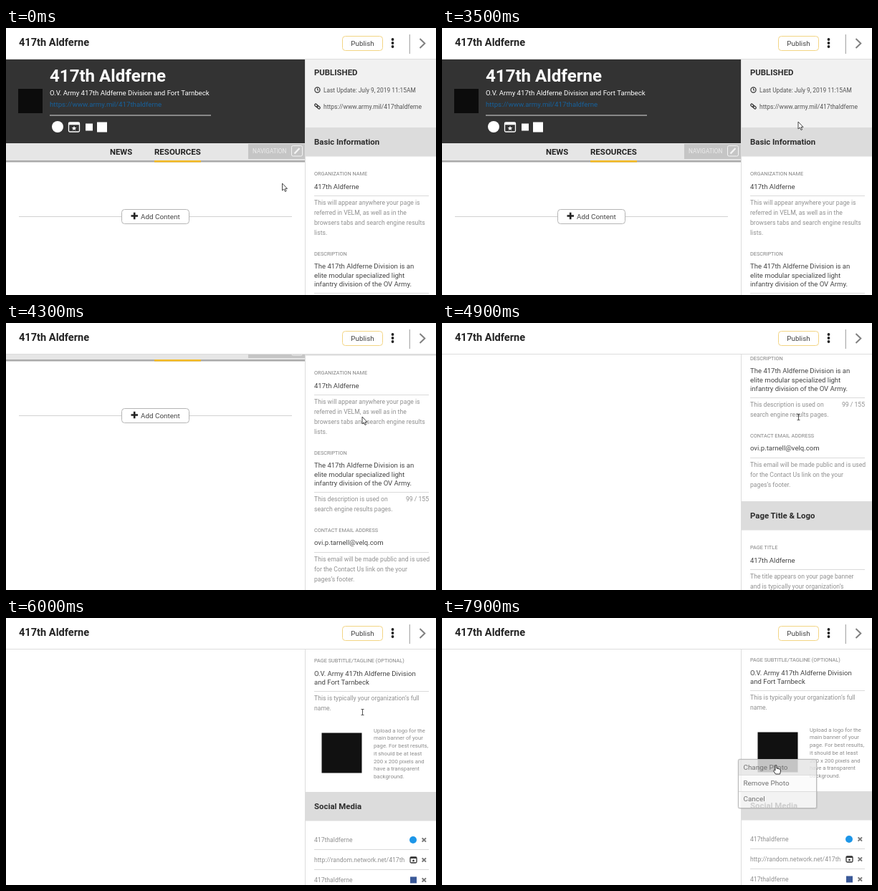
Recreate the animation shown at these times as an HTML page. Size 600x373 px, loop 8000 ms.

```html
<!DOCTYPE html>
<html lang="en">
<head>
<meta charset="utf-8">
<title>Page editor</title>
<style>
html, body { margin: 0; width: 100%; height: 100%; overflow: hidden; background: #fff; }
svg { display: block; font-family: Roboto, Inter, sans-serif; }
</style>
</head>
<body>
<svg id="stage" width="600" height="373" viewBox="0 0 600 373"></svg>
<script>
const LOOP = 8000, STEP = 100;
const NAME = '417th Aldferne', HANDLE = '417thaldferne';
const URL_TEXT = 'https://www.army.mil/' + HANDLE;

// Drawing helpers, all returning SVG markup
const text = (x, y, size, str, fill = '#333', weight = 400, extra = '') =>
  `<text x="${x}" y="${y}" font-size="${size}" fill="${fill}" font-weight="${weight}" ${extra}>${str}</text>`;
const rect = (x, y, w, h, fill, extra = '') =>
  `<rect x="${x}" y="${y}" width="${w}" height="${h}" fill="${fill}" ${extra}/>`;
const path = (d, stroke, width = 1, extra = '') =>
  `<path d="${d}" fill="none" stroke="${stroke}" stroke-width="${width}" ${extra}/>`;
const circle = (x, y, r, fill, extra = '') =>
  `<circle cx="${x}" cy="${y}" r="${r}" fill="${fill}" ${extra}/>`;
const lines = (x, y, gap, size, rows, fill, weight) =>
  rows.map((row, i) => text(x, y + i * gap, size, row, fill, weight)).join('');

const label = (y, str) => text(430, y, 7.3, str, '#808080');
const value = (y, ...rows) => lines(430, y, 12.5, 9.55, rows, '#444', 400);
const help = (y, ...rows) => lines(430, y, 14, 8.65, rows, '#909090', 400);
const rule = y => path(`M430 ${y}H590`, '#dadada');
const band = (y, str) => rect(418, y, 182, 40.5, '#dcdcdc') + text(430, y + 24, 11.4, str, '#2c2c2c', 600);

const star = (x, y, r) => '<polygon fill="currentColor" points="' + Array.from({ length: 10 }, (_, i) => {
  const a = i * Math.PI / 5, q = i % 2 ? r * .45 : r;
  return (x + q * Math.sin(a)).toFixed(2) + ',' + (y - q * Math.cos(a)).toFixed(2);
}).join(' ') + '"/>';
const windowIcon = (x, y, w, h) =>
  rect(x - w / 2, y - h / 2, w, h, 'none', 'rx="1.5" stroke="currentColor" stroke-width="1.3"') +
  rect(x - w / 2, y - h / 2, w, h * .25, 'currentColor') + star(x, y + h * .13, h * .27);

const banner = () =>
  rect(0, 43, 417, 118, '#333') +
  rect(17, 85, 34, 34, '#0c0c0c') +
  text(61, 75, 24.1, NAME, '#fff', 700) +
  text(61, 94, 9.65, `O.V. Army ${NAME} Division and Fort Tarnbeck`, '#fff') +
  text(61, 110, 9.7, URL_TEXT, '#17619c') +
  path('M61 122H286', '#ddd') +
  `<g class="social">${circle(72, 138, 8, 'currentColor')}</g>` +
  `<g class="social">${windowIcon(95, 138.5, 15, 13)}</g>` +
  `<g class="social">${rect(111, 133.5, 10, 10, 'currentColor')}</g>` +
  `<g class="social">${rect(127, 131.5, 14, 14, 'currentColor')}</g>`;

const nav = () =>
  rect(0, 161, 417, 24, '#e6e6e6') + rect(0, 185, 417, 2.5, '#aaa') +
  text(145, 177, 11.3, 'NEWS', '#222', 600) +
  text(207, 177, 11.5, 'RESOURCES', '#222', 600) +
  rect(207, 185, 65, 2.5, '#f4b921') +
  rect(338, 162, 79, 21, '#c5c5c5') +
  text(344, 175, 8.2, 'NAVIGATION', '#ececec') +
  rect(398.5, 164.5, 15, 14.5, 'none', 'rx="2" stroke="#f4f4f4"') +
  path('M402.5 175.5L409.5 168', '#f4f4f4', 2.4);

const adder = () =>
  path('M18 263.5H399', '#d2d2d2') +
  rect(161.5, 253.5, 94, 20, '#fff', 'rx="4" stroke="#b5b5b5"') +
  path('M174.5 262.5H184M179.2 257.8V267.2', '#222', 2.6) +
  text(188, 267, 9.9, 'Add Content', '#444');

const panel = () =>
  rect(418, 43, 182, 96, '#f1f1f1') +
  text(430, 66.3, 11.4, 'PUBLISHED', '#2c2c2c', 600) +
  circle(434.5, 86.5, 3.6, 'none', 'stroke="#333" stroke-width="1.2"') +
  path('M434.5 84.2V86.8H436.4', '#333') +
  text(443, 89.8, 8.35, 'Last Update: July 9, 2019 11:15AM', '#555') +
  `<g transform="rotate(40 434.5 109.5)">` +
  rect(430, 108, 5, 3, 'none', 'rx="1.5" stroke="#333" stroke-width="1.2"') +
  rect(434, 108, 5, 3, 'none', 'rx="1.5" stroke="#333" stroke-width="1.2"') + '</g>' +
  text(443, 113, 8.5, URL_TEXT, '#555') +
  band(139, 'Basic Information') +
  label(206, 'ORGANIZATION NAME') + value(225, NAME) + rule(234.5) +
  help(247, 'This will appear anywhere your page is', 'referred in VELM, as well as in the',
    'browsers tabs and search engine results', 'lists.') +
  label(318, 'DESCRIPTION') +
  value(336.3, `The ${NAME} Division is an`, 'elite modular specialized light', 'infantry division of the OV Army.') +
  rule(370.5) +
  help(383, 'This description is used on', 'search engine results pages.') +
  text(590, 383, 8.65, '99 / 155', '#909090', 400, 'text-anchor="end"') +
  label(425.5, 'CONTACT EMAIL ADDRESS') + value(444, 'ovi.p.tarnell@velq.com') + rule(454.5) +
  help(466.5, 'This email will be made public and is used', 'for the Contact Us link on the your', 'pages’s footer.') +
  band(515, 'Page Title &amp; Logo') +
  label(582, 'PAGE TITLE') + value(600.5, NAME) + rule(610.5) +
  help(623, 'The title appears on your page banner', 'and is typically your organization’s', 'acronym.') +
  label(679, 'PAGE SUBTITLE/TAGLINE (OPTIONAL)') +
  value(697.5, `O.V. Army ${NAME} Division`, 'and Fort Tarnbeck') + rule(719.5) +
  help(732, 'This is typically your organization’s full', 'name.') +
  rect(440.5, 777.5, 56, 56, '#111') +
  lines(513, 776.7, 10.7, 7.75, ['Upload a logo for the', 'main banner of your', 'page. For best results,',
    'it should be at least', '200 x 200 pixels and', 'have a transparent', 'background.'], '#8c8c8c', 400) +
  band(860, 'Social Media') +
  help(929.5, HANDLE) + help(957.5, `http://random.network.net/${HANDLE.slice(0, 5)}`) + help(986, HANDLE) +
  rule(940.5) + rule(968.5) +
  circle(568, 927, 5, '#1d96e8') +
  `<g color="#333">${windowIcon(568.5, 955, 9, 8)}</g>` +
  rect(564, 978.5, 9, 9, '#3b5998') +
  [927, 955, 983].map(y => path(`M580.6 ${y - 2.6}L586 ${y + 2.6}M586 ${y - 2.6}L580.6 ${y + 2.6}`, '#777', 2)).join('');

const header = () =>
  rect(0, 0, 600, 43, '#fff') + path('M0 43.5H600', '#ddd') +
  text(18, 25, 14.6, NAME, '#222', 600) +
  rect(469.5, 11.5, 56, 20, '#fff', 'rx="4" stroke="#f3d584"') +
  text(497.5, 24.8, 9.8, 'Publish', '#444', 400, 'text-anchor="middle"') +
  [16, 21, 26].map(y => circle(539.5, y, 1.9, '#222')).join('') +
  path('M563.3 9V36', '#aaa', 1.2) +
  path('M577.5 15L584.3 21.5L577.5 28', '#808080', 2);

const menu = () =>
  rect(413.5, 197.5, 109.5, 68.5, 'none', 'rx="2" stroke="#000" stroke-width="2" opacity=".1"') +
  rect(413.5, 197.5, 109, 68, '#fafafa', 'rx="2" fill-opacity=".78" stroke="#bbb"') +
  rect(414, 198, 108, 21.5, '#bbb', 'opacity=".28"') +
  path('M414 219.5H522M414 242.5H522', '#ddd') +
  lines(420.5, 211.5, 22.3, 9.9, ['Change Photo', 'Remove Photo', 'Cancel'], '#707070', 400);

const pointers = {
  arrow: `<path d="M0 0V10L2.3 8 4 11.5 5.6 10.8 4 7.4H7Z" fill="#fff" stroke="#333" stroke-width=".9"/>`,
  hand: `<path d="M-1 0Q0-1 1 0V4L5 5Q7 5.5 6.5 8L5.5 12H-.5L-3.5 7.5Q-3.5 6-1 7Z" fill="#fff" stroke="#222" stroke-width=".9"/>`,
  beam: path('M-1.5-3.5H2.5M.5-3.5V4.5M-1.5 4.5H2.5', '#555')
};

const stage = document.getElementById('stage');
stage.innerHTML = rect(0, 0, 600, 373, '#fff') + path('M417.5 43V373', '#ddd') +
  `<g id="page">${banner()}${nav()}${adder()}${panel()}</g>${header()}` +
  `<g id="menu">${menu()}</g><g id="pointer"></g>`;
const [page, menuBox, pointer] = ['page', 'menu', 'pointer'].map(id => document.getElementById(id));
const socials = [...document.querySelectorAll('.social')];
const socialX = [72, 95, 116, 134];

// Keys: time, then values
const scrollKeys = [[3800, 0], [4300, 134], [4700, 226], [4800, 226], [5300, 426], [5800, 612], [6000, 617], [6300, 618]];
const pointerKeys = [
  [0, 385.5, 217], [100, 340.5, 214], [200, 340.5, 214], [400, 140, 60], [600, 6, 24], [800, 110, 28],
  [1000, 512, 13], [1100, 512, 13], [1200, 518, 17], [1500, 6, 105], [1700, 68, 131], [1800, 95, 137],
  [1900, 116, 139], [2000, 134, 160], [2200, 202, 120], [2400, 100, 64], [2600, 12, 100], [2800, 72, 136],
  [2900, 100, 162], [3100, 32, 87], [3400, 497, 131], [6000, 497, 131], [6300, 497, 12], [6600, 455, 160],
  [6800, 470, 200], [7200, 562, 305], [7500, 562, 359], [7700, 470, 192], [7800, 466, 206]
];

function sample(keys, t) {
  const i = keys.findIndex(k => k[0] > t);
  if (i < 0) return keys[keys.length - 1].slice(1);
  if (i === 0) return keys[0].slice(1);
  const a = keys[i - 1], b = keys[i], f = (t - a[0]) / (b[0] - a[0]);
  return a.slice(1).map((v, j) => v + (b[j + 1] - v) * f);
}

function pointerKind(t, hovering) {
  if (hovering || t >= 7700) return 'hand';
  return t >= 4800 && t <= 6000 ? 'beam' : 'arrow';
}

function draw(now) {
  const t = Math.floor(now % LOOP / STEP) * STEP;
  const [scroll] = sample(scrollKeys, t), [x, y] = sample(pointerKeys, t);
  page.setAttribute('transform', `translate(0 ${-Math.round(scroll)})`);

  const hovered = socialX.findIndex(sx => Math.hypot(x - sx, y - 138) < 9.5);
  socials.forEach((g, i) => g.setAttribute('color', i === hovered ? '#f6b81f' : '#fff'));

  menuBox.setAttribute('opacity', Math.min(1, Math.max(0, (t - 7700) / 200)));
  pointer.innerHTML = pointers[pointerKind(t, hovered >= 0)];
  pointer.setAttribute('transform', `translate(${x} ${y})`);
  requestAnimationFrame(draw);
}
draw(0);
</script>
</body>
</html>
```
